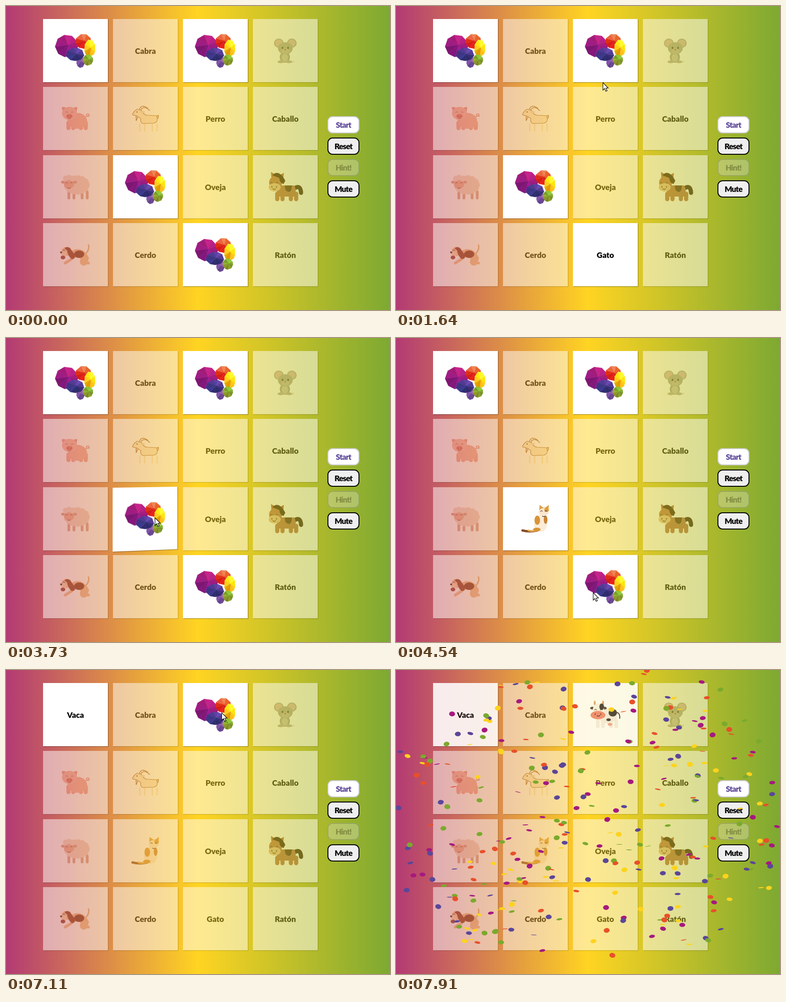
Animation, 829 px wide and 654 px high, one loop 7990 ms. Source, as an HTML page with a canvas:

```html
<!DOCTYPE html>
<html lang="es">
<head>
<meta charset="utf-8">
<title>Memoria de animales</title>
<style>
html, body { margin: 0; width: 100%; height: 100%; overflow: hidden; }
#stage { position: relative; width: 829px; height: 654px; overflow: hidden;
  background: linear-gradient(90deg, #b33a74, #ffd422 50%, #7da932); }
#board { position: absolute; inset: 0; perspective: 1000px; perspective-origin: 377px 232px; }
.card { position: absolute; width: 140px; height: 136px; background: #fff;
  box-shadow: 1px 1px 1px rgba(0,0,0,.35); }
.face { position: absolute; inset: 0; display: flex; align-items: center; justify-content: center;
  font: 900 17px Lato, sans-serif; color: #000; }
#panel { position: absolute; left: 694px; top: 237px; display: grid; gap: 9px; }
.button { width: 69px; height: 37px; box-sizing: border-box; border: 2px solid #000;
  border-radius: 11px; background: #efefef; text-align: center;
  font: 900 17px/33px Lato, sans-serif; letter-spacing: -.9px; }
.start { background: #fff; border-color: #ccc; color: #5b4699; }
.hint { background: rgba(239,239,239,.3); border-color: rgba(90,100,60,.3); color: rgba(70,75,20,.45); }
#cursor, canvas { position: absolute; left: 0; top: 0; }
</style>
</head>
<body>
<div id="stage">
  <div id="board"></div>
  <div id="panel">
    <div class="button start">Start</div>
    <div class="button">Reset</div>
    <div class="button hint">Hint!</div>
    <div class="button">Mute</div>
  </div>
  <svg id="cursor" width="14" height="22"><path d="M.7 .8V17l3.7-3.5 2.6 6 2.8-1.2-2.6-5.8h5z" fill="#fff" stroke="#000" stroke-width="1.1"/></svg>
  <canvas width="829" height="654"></canvas>
</div>
<script>
const LOOP = 7990, FLIP = 500, FADE = 1000, TAU = Math.PI * 2;
const clamp = v => Math.max(0, Math.min(1, v));
const smooth = v => (v = clamp(v)) * v * (3 - 2 * v);
let seed = 41;
const random = () => (seed = seed * 16807 % 2147483647) / 2147483647;
const times = (n, make) => Array.from({ length: n }, (_, i) => make(i));

// Drawing helpers; the origin is the middle of a card.
const oval = (fill, x, y, rx, ry = rx) => `<ellipse fill="${fill}" cx="${x}" cy="${y}" rx="${rx}" ry="${ry}"/>`;
const pair = (fill, x, y, gap, rx, ry) => oval(fill, x - gap, y, rx, ry) + oval(fill, x + gap, y, rx, ry);
const shape = (fill, d) => `<path fill="${fill}" d="${d}"/>`;
const line = (color, d, width = 1.2) =>
  `<path fill="none" stroke="${color}" stroke-width="${width}" stroke-linecap="round" d="${d}"/>`;
const legs = (color, left, right, bottom, width = 8) => times(4, i =>
  line(color, `M${left + (right - left) * (i + (i > 1 ? .3 : -.3)) / 3} ${bottom - 16}V${bottom - width / 2}`, width)).join('');
const smile = (color, x, y, gap) =>
  line(color, `M${x - gap - 2} ${y}q2-3 4 0M${x + gap - 2} ${y}q2-3 4 0M${x - 3} ${y + gap * 2}q3 3 6 0`);

// A low-poly lobe: a fan of facets, lighter towards the top.
function lobe(hue, sat, light, x, y, rx, ry) {
  const count = 9, rim = times(count, i => {
    const a = (i + random() * .5) / count * TAU;
    return [x + rx * Math.cos(a), y + ry * Math.sin(a)];
  });
  const hub = [x + rx * .15, y - ry * .1];
  return rim.map((p, i) => {
    const rise = (y - p[1]) / ry;
    const tint = `hsl(${hue + rise * 9} ${sat}% ${light + rise * 5 + (random() - .5) * 13}%)`;
    return `<polygon fill="${tint}" stroke="${tint}" stroke-width=".6" points="${[hub, p, rim[(i + 1) % count]].join(' ')}"/>`;
  }).join('');
}

const art = {
  brain: lobe(313, 70, 38, -19, -10, 25, 24) + lobe(10, 82, 53, 17, -20, 17, 16) +
    lobe(50, 100, 52, 31, -5, 12, 19) + lobe(275, 35, 48, 11, 24, 9, 13) +
    lobe(76, 58, 41, 27, 20, 11, 12) + lobe(249, 42, 40, -1, 8, 20, 14),

  cow: line('#3a3535', 'M22-5q10 0 9 13', 2) + legs('#f5ede6', -13, 20, 29) +
    oval('#f5ede6', 5, 3, 20, 16) + oval('#403b3b', 16, -4, 9, 8) + oval('#403b3b', 7, 11, 5, 3) +
    oval('#f0a18f', 10, 21, 5, 3) + pair('#d9a777', -14, -25, 9, 2, 5) + pair('#554945', -15, -14, 13, 5, 3) +
    oval('#faf2e9', -15, -10, 12, 14) + oval('#403b3b', -8, -17, 5, 7) +
    oval('#ef8979', -16, 1, 16, 9) + pair('#9b4e48', -16, -1, 6, 1.5, 2) + smile('#2c2525', -15, -10, 6),

  mouse: line('#ead7c8', 'M5 24q13 3 13-2', 2) + pair('#aaa39a', 0, -16, 14, 10.5, 10) +
    pair('#d8b4b0', 0, -16, 14, 8, 8) + oval('#a09f98', -1, 14, 11, 12) + oval('#c5bfb3', -1, 15, 7, 9) +
    oval('#aaa69c', 0, -5, 16, 13) + oval('#bdb1a7', 0, 1, 9, 6) + pair('#4b4039', 0, -6, 6, 1.8, 2.5) +
    oval('#8c6461', 0, -2, 2, 1.4) + pair('#b4a9a0', -1, 24, 9, 7, 3),

  pig: line('#e09080', 'M22-4q12-3 5-6-7 1-1 5h4', 1.6) + legs('#f3a491', -12, 19, 25, 9) +
    oval('#f6ad9a', 4, 5, 21, 17) + shape('#ec9586', 'M-30-24q9-2 13 5l-9 8zM-8-20q6-6 12-4l-2 12z') +
    oval('#f8b5a3', -13, -11, 16, 14) + oval('#e8786c', -13, -5, 7, 5) +
    pair('#b45148', -13, -5, 3, 1.3, 2) + smile('#a45d50', -13, -13, 6),

  goat: line('#a36f3e', 'M-13-20Q-8-32 5-22M-10-19Q-2-29 9-17M25-5q5-5 2 5M-20-5v10l4-9', 1.6) +
    `<g stroke="#a36f3e" stroke-width="1.1">` + legs('#f9e7c6', -9, 22, 28, 3) +
    shape('#fbebcd', 'M-18-20Q-27-14-28-8L-18-5-10 0Q-12 10-4 11L18 10Q29 8 24-6L4-7Q-5-8-8-17Z') + '</g>' +
    oval('#eddaba', -6, -14, 5, 2) + oval('#48301f', -18, -14, 1.2),

  sheep: legs('#d9a38b', -11, 22, 27, 6) +
    times(13, i => oval('#f2d5c5', 3 + 20 * Math.cos(i / 13 * TAU), -4 + 13 * Math.sin(i / 13 * TAU), 8)).join('') +
    oval('#f2d5c5', 3, -4, 21, 15) + pair('#d99a85', -14, -10, 13, 4, 3) + oval('#ecaa92', -14, -6, 11, 10) +
    times(3, i => oval('#f3d8c9', -21 + i * 7, -18 - i % 2 * 2, 6)).join('') + smile('#8a473b', -14, -8, 5),

  cat: line('#8a4f22', 'M4 25Q-13 29-28 25', 5) + line('#e8b057', 'M3 25Q-10 27-15 25', 4) +
    oval('#fbecd7', 11, 13, 14, 15) + oval('#fbecd7', 15, -1, 9, 12) +
    oval('#d99337', 4, 3, 6, 10) + oval('#c98436', 22, 2, 4, 9) + oval('#d99337', 3, 23, 8, 4) +
    shape('#dfa044', 'M8-16l1-14 8 6h4l8-6-1 14z') + oval('#fae7ce', 18, -15, 11, 8) +
    oval('#dd9b3b', 24, -19, 5, 4) + smile('#49301f', 18, -16, 5),

  horse: line('#321811', 'M20 3q13-8 14 10', 9) + legs('#b06a48', -14, 20, 31, 9) +
    shape('#b06a48', 'M-18-3H18Q24 0 22 21H-18Z') + shape('#4c281b', 'M-1-3h15q0 14-7 14-9-2-8-14z') +
    shape('#a65e41', 'M-30-18l-1-14 10 6h10l8-4-2 18z') + oval('#b56e4b', -21, -9, 14, 14) +
    shape('#321811', 'M-28-25q14-14 28 12l-4 7q-8-2-9-13z') + oval('#e3b990', -23, 1, 13, 9) +
    pair('#704b36', -24, 0, 5, 1.3, 2) + smile('#38231a', -24, -8, 6),

  dog: line('#e2b483', 'M23-3Q31-13 28-21', 3) + line('#f0bc8f', 'M-6 0Q10-10 20 8L18 15', 17) +
    line('#f0bc8f', 'M-8 9L-22 18M15 18H28', 6) + oval('#7b341c', 8, -1, 11, 8) +
    oval('#f4c79c', -19, -7, 11, 10) + oval('#f8d7ae', -25, -2, 6, 5) +
    shape('#883c20', 'M-24-14q10-6 15 4l9 12q-2 9-9 7-8-8-9-18z') +
    oval('#30231d', -31, -5, 2.2, 2) + oval('#8b3a2c', -27, 6, 5, 4) + line('#40251b', 'M-27-9q2-3 4 0')
};

// Cards in reading order: content, flip times (they alternate open and shut), match time.
const BACK = 2860, MATCHES = [5100, 7680];
const deck = [
  ['Vaca', [6250], MATCHES[1]], ['Cabra'], ['cow', [1880, BACK, 7130], MATCHES[1]], ['mouse'],
  ['pig'], ['goat'], ['Perro'], ['Caballo'],
  ['sheep'], ['cat', [3660], MATCHES[0]], ['Oveja'], ['horse'],
  ['dog'], ['Cerdo'], ['Gato', [980, BACK, 4520], MATCHES[0]], ['Ratón']
];
const board = document.getElementById('board'), cursor = document.getElementById('cursor');
const face = name => `<div class="face">${art[name]
  ? `<svg width="140" height="136" viewBox="-70 -68 140 136">${art[name]}</svg>` : name}</div>`;
const cards = deck.map(([name, flips, match], i) => {
  const node = document.createElement('div');
  node.className = 'card';
  node.style.cssText = `left:${80 + i % 4 * 151}px;top:${Math.round(28 + (i >> 2) * 146.4)}px;opacity:.5`;
  node.innerHTML = face(name) + (flips ? face('brain') : '');
  board.append(node);
  return { node, flips, match };
});

function showCard({ node, flips, match }, t) {
  if (!flips) return;
  const angle = flips.reduce((sum, at, i) => sum + (i % 2 ? -180 : 180) * smooth((t - at) / FLIP), 0);
  const open = angle >= 90, [front, back] = node.children;
  front.style.display = open ? 'flex' : 'none';
  back.style.display = open ? 'none' : 'flex';
  node.style.transform = `rotateY(${open ? angle - 180 : angle}deg)`;
  node.style.opacity = 1 - .5 * clamp((t - match) / FADE);
}

// The pointer rests at each stop [arrival, x, y], then glides to the next.
const stops = [
  [260, 758, 622], [760, 463, 503], [1640, 446, 164], [1800, 450, 100], [2510, 457, 277],
  [3530, 329, 390], [3730, 321, 386], [4260, 425, 547], [5250, 500, 188], [5700, 131, 104],
  [6900, 525, 118], [7110, 465, 91], [7680, 490, -24]
];
function showCursor(t) {
  const i = stops.findIndex(stop => stop[0] > t);
  cursor.style.display = i > 0 ? '' : 'none';
  if (i < 1) return;
  const [t0, x0, y0] = stops[i - 1], [t1, x1, y1] = stops[i];
  const k = smooth(1 - (t1 - t) / Math.min(500, t1 - t0));
  cursor.style.transform = `translate(${x0 + (x1 - x0) * k}px,${y0 + (y1 - y0) * k}px)`;
}

const colors = ['#e8502a', '#5b4699', '#a6197f', '#fdd31c', '#7aaa2d'];
const spread = v => Math.sign(v) * Math.abs(v) ** .7;
const confetti = times(300, i => {
  const a = random() * TAU, r = Math.sqrt(random());
  return { x: 425 * r * spread(Math.cos(a)), y: 312 * r * spread(Math.sin(a)),
    color: colors[i % 5], phase: random() * Math.PI, tilt: (random() - .5) * .5 };
});
const ctx = document.querySelector('canvas').getContext('2d');
function showConfetti(t) {
  ctx.clearRect(0, 0, 829, 654);
  if (t < 7720) return;
  const age = (t - 7720) / 190, grow = .9 + .1 * Math.sqrt(age);
  for (const p of confetti) {
    ctx.fillStyle = p.color;
    ctx.beginPath();
    ctx.ellipse(410 + p.x * grow, 306 + p.y * grow, 6.4,
      .6 + 4.6 * Math.abs(Math.cos(p.phase + age)), p.tilt, 0, TAU);
    ctx.fill();
  }
}

function frame() {
  const t = performance.now() % LOOP;
  cards.forEach(card => showCard(card, t));
  showCursor(t);
  showConfetti(t);
  requestAnimationFrame(frame);
}
frame();
</script>
</body>
</html>
```
